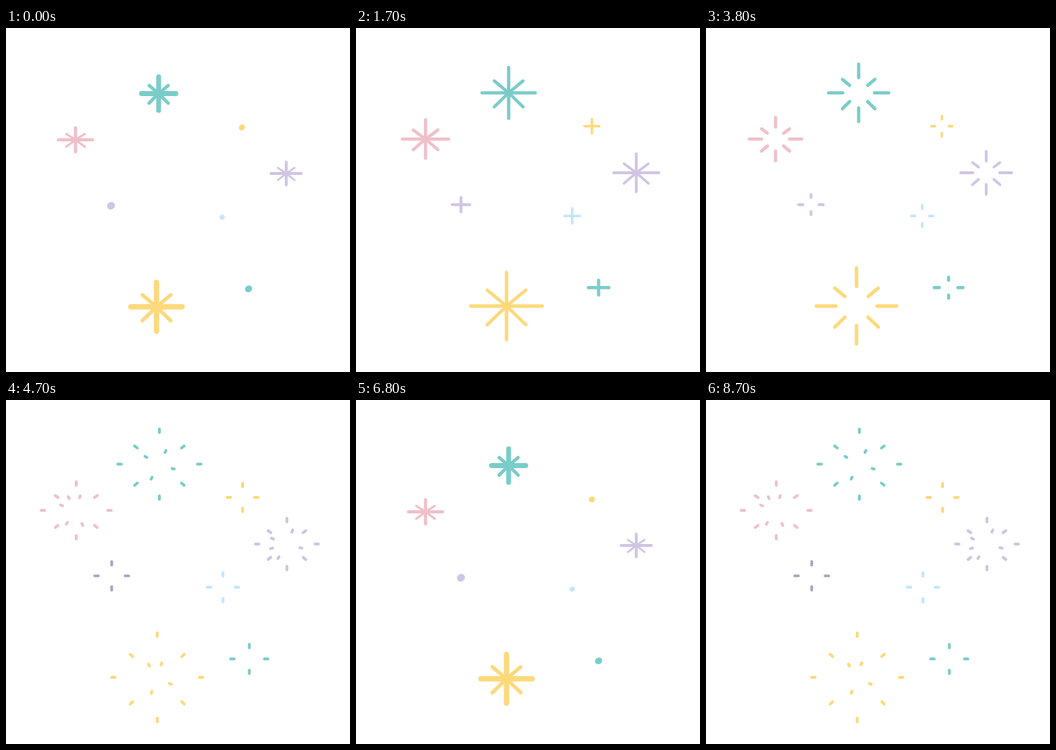
An HTML page with a canvas that plays this animation: 480 px wide and 480 px high, repeating every 8.8 s.

```html
<!DOCTYPE html>
<html lang="en">
<head>
<meta charset="utf-8">
<title>Sparkles</title>
<style>
html, body { margin: 0; width: 100%; height: 100%; overflow: hidden; background: #fff; }
canvas { display: block; width: 100vmin; height: 100vmin; }
</style>
</head>
<body>
<canvas id="stage" width="480" height="480"></canvas>
<script>
const ctx = document.getElementById('stage').getContext('2d');
const STEP = 100;
const TEAL = '#7accc9', GOLD = '#fdd97b', PINK = '#f0c0c9', LILAC = '#d0c5e4', SKY = '#c4e5fc';

// small, big: [x radius, y radius, line width]; fly: how far dashes leave the big tips
// inner: directions of the short inner dashes, in degrees
const stars = [
  { x: 213, y: 90.5, color: TEAL, small: [27.3, 26.8, 6.8], big: [39.5, 37.7, 4.6], fly: [16, 9], inner: [-63, 212, 15, 118] },
  { x: 97, y: 155, color: PINK, small: [26, 19, 4.5], big: [34.5, 29, 4.5], fly: [12, 8.5], inner: [-73, 243, 202, 125, 63], dashColor: '#eec0cf' },
  { x: 391, y: 202, color: LILAC, small: [23.2, 18, 3.9], big: [33.5, 28.5, 3.8], fly: [8, 5], inner: [-66, 204, 166, 12, 121], dashColor: '#cdc5e1' },
  { x: 210, y: 388, color: GOLD, small: [39.5, 37.7, 7.3], big: [52.2, 49.5, 4.8], fly: [9, 10], inner: [-71, 240, 23, 109] }
];

const pluses = [
  { x: 329.1, y: 137, color: GOLD, dot: 4.2, big: [12.2, 11.8, 3.4] },
  { x: 146.5, y: 246.4, color: LILAC, dot: 5.4, big: [14.2, 12, 4], dashColor: '#a9a5c1' },
  { x: 301.7, y: 262.3, color: SKY, dot: 3.5, big: [12.5, 12.5, 3.4] },
  { x: 338.5, y: 362.3, color: TEAL, dot: 4.9, big: [16.5, 12.5, 4.4] }
].map(p => ({ ...p, fly: [7, 5.5] }));

const AXES = [[1, 0], [-1, 0], [0, 1], [0, -1]];
const DIAGONALS = [[1, 1], [-1, 1], [1, -1], [-1, -1]];

// Rounded line whose caps end at the given points
function line(x1, y1, x2, y2, w) {
  const len = Math.hypot(x2 - x1, y2 - y1);
  const k = Math.min(0.5, w / 2 / len);
  const dx = (x2 - x1) * k, dy = (y2 - y1) * k;
  ctx.lineWidth = w;
  ctx.beginPath();
  ctx.moveTo(x1 + dx, y1 + dy);
  ctx.lineTo(x2 - dx, y2 - dy);
  ctx.stroke();
}

// Calls paint(dx, dy, isDiagonal) with the tip of every ray
function eachRay(s, rx, ry, paint) {
  for (const [u, v] of AXES) paint(u * rx, v * ry, false);
  if (!s.inner) return;
  // Lower diagonals reach a little further than the upper ones
  for (const [u, v] of DIAGONALS) paint(u * rx * 0.55, v * ry * (0.52 + 0.04 * v), true);
}

function rays(s, [rx, ry, w], { from = 0, to = 1, thin = 1, drop = 0 } = {}) {
  const y = s.y + drop;
  eachRay(s, rx, ry, (dx, dy, diagonal) =>
    line(s.x + dx * from, y + dy * from, s.x + dx * to, y + dy * to, diagonal ? w * thin : w));
}

function dash(x, y, angle, len) {
  const dx = Math.cos(angle) * len / 2, dy = Math.sin(angle) * len / 2;
  line(x - dx, y - dy, x + dx, y + dy, 3.9);
}

function seed(s) {
  if (s.inner) return rays(s, s.small, { thin: 0.7, drop: 1 });
  ctx.beginPath();
  ctx.ellipse(s.x, s.y + 1.7, s.dot * 1.05, s.dot * 0.95, -0.6, 0, Math.PI * 2);
  ctx.fill();
}

function bloom(s) {
  rays(s, s.big, { thin: 0.95 });
}

// Rays detached from the middle and pushed outwards
function burst(s) {
  rays(s, s.big, s.inner ? { from: 0.5, to: 1.12 } : { from: 0.65, to: 1.35 });
}

function scatter(s) {
  const [rx, ry] = s.big, [fx, fy] = s.fly;
  const x = s.x + 1, y = s.y - 1;
  eachRay(s, rx + fx, ry + fy, (dx, dy, diagonal) => {
    const spread = diagonal ? 1.07 : 1;
    dash(x + dx * spread, y + dy * spread, Math.atan2(dy, dx), 8.8);
  });
  for (const deg of s.inner ?? []) {
    const a = deg * Math.PI / 180;
    dash(s.x + Math.cos(a) * 21, s.y + Math.sin(a) * 21, a, 7);
  }
}

const poses = [seed, bloom, burst, scatter];

function draw(time) {
  const pose = poses[Math.floor(time / STEP) % poses.length];
  ctx.fillStyle = '#fff';
  ctx.fillRect(0, 0, 480, 480);
  ctx.lineCap = 'round';
  for (const s of [...stars, ...pluses]) {
    ctx.fillStyle = ctx.strokeStyle = pose === scatter && s.dashColor || s.color;
    pose(s);
  }
}

let start;
function tick(now) {
  start ??= now;
  draw(Math.max(0, now - start));
  requestAnimationFrame(tick);
}
draw(0);
requestAnimationFrame(tick);
</script>
</body>
</html>
```
